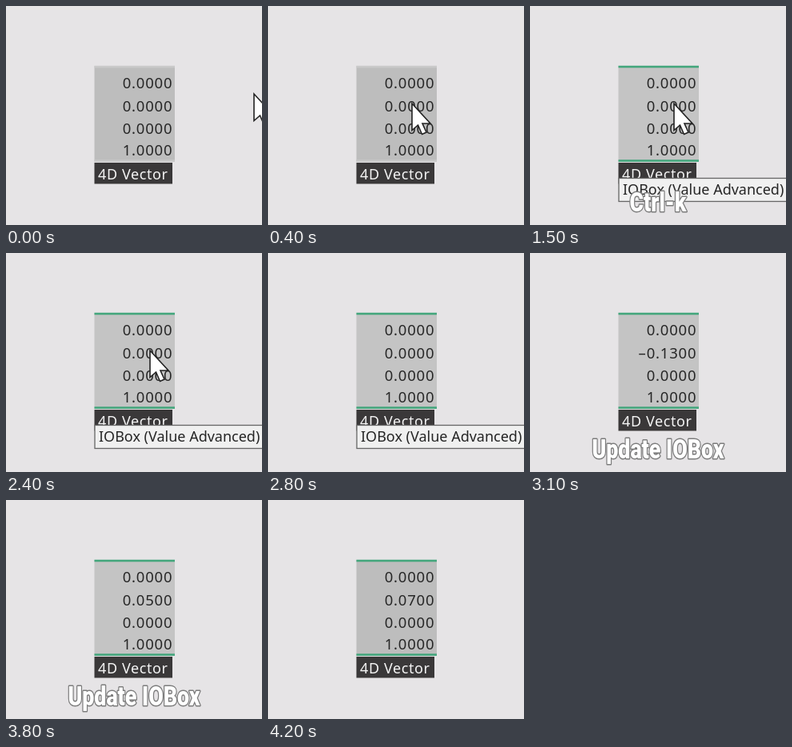
An HTML page that plays this animation: 320 px wide and 274 px high, repeating every 4500 ms.

```html
<!DOCTYPE html>
<html lang="en">
<head>
<meta charset="utf-8">
<style>
  html, body { margin: 0; width: 100%; height: 100%; overflow: hidden; background: #e6e4e6; }
  svg { display: block; width: 100vw; height: 100vh; }
  text { font: 500 18px "Noto Sans", "Open Sans", sans-serif; fill: #262626; white-space: pre; }
  .value { font-size: 18.5px; letter-spacing: .8px; text-anchor: end; }
  .label { letter-spacing: .6px; fill: #f4f4f4; }
  .caption {
    font: 900 33.5px Roboto, sans-serif;
    text-anchor: middle; fill: #fff; stroke: #7c7c7c; stroke-width: 3px;
    stroke-linejoin: round; paint-order: stroke;
  }
</style>
</head>
<body>
<svg viewBox="0 0 320 274">
  <rect width="320" height="274" fill="#e6e4e6"/>
  <rect id="box" x="110.5" y="75" width="100.5" height="120"/>
  <rect id="top" x="110.5" y="74.7" width="100.5" height="2.6"/>
  <rect id="bottom" x="110.5" y="192.3" width="100.5" height="2.6"/>
  <g id="values"></g>
  <rect x="110.5" y="196" width="97.5" height="26.5" fill="#3a3839"/>
  <text class="label" x="115" y="217">4D Vector</text>
  <g id="tip">
    <rect x="111" y="215.5" width="220" height="29" fill="#f0f0f0" stroke="#666" stroke-width="1.3"/>
    <text x="116" y="236">IOBox (Value Advanced)</text>
  </g>
  <path id="cursor" d="M0 0V33.5L7.5 27L12.5 38.5L18 36L13 25H23Z" fill="#fff" stroke="#222" stroke-width="1.6"/>
  <g transform="translate(160 256.5) scale(.8 1)">
    <text id="caption" class="caption"></text>
  </g>
</svg>
<script>
const LOOP = 4500;
const $ = id => document.getElementById(id);

const rows = [103, 131.5, 160, 186.5].map((y, i) => {
  const t = document.createElementNS("http://www.w3.org/2000/svg", "text");
  t.setAttribute("class", "value");
  t.setAttribute("x", 208.3);
  t.setAttribute("y", y);
  t.textContent = i === 3 ? "1.0000" : "0.0000";
  $("values").append(t);
  return t;
});

// [start time, value] steps of the dragged component
const drag = [
  [0, 0], [2900, -.04], [3000, -.09], [3100, -.13], [3300, -.11], [3400, -.08],
  [3500, -.05], [3600, -.02], [3700, .02], [3800, .05], [4000, .06], [4100, .07]
];
const path = [[0, 310, 110], [100, 276, 111], [200, 228, 115], [300, 192, 120], [400, 180, 122]];

const at = (steps, t) => steps.filter(s => s[0] <= t).pop();
const within = (t, a, b) => t >= a && t < b;
const show = (id, on) => $(id).setAttribute("visibility", on ? "visible" : "hidden");

function render(t) {
  const [, x, y] = at(path, t);
  $("cursor").setAttribute("transform", `translate(${x} ${y})`);
  show("cursor", t < 2800);
  show("tip", within(t, 700, 2900));

  const edge = t >= 1500 ? "#43a67c" : t >= 600 ? "#858585" : "#c9c9c9";
  $("top").setAttribute("fill", edge);
  $("bottom").setAttribute("fill", edge);
  $("box").setAttribute("fill", within(t, 1500, 4200) ? "#c4c4c4" : "#bdbdbd");

  rows[1].textContent = at(drag, t)[1].toFixed(4).replace("-", "\u2013");

  $("caption").textContent =
    within(t, 1400, 2400) ? "Ctrl-k" :
    within(t, 3000, 4200) ? "Update IOBox" : "";
}

function tick() {
  render(performance.now() % LOOP);
  requestAnimationFrame(tick);
}
tick();
</script>
</body>
</html>
```
